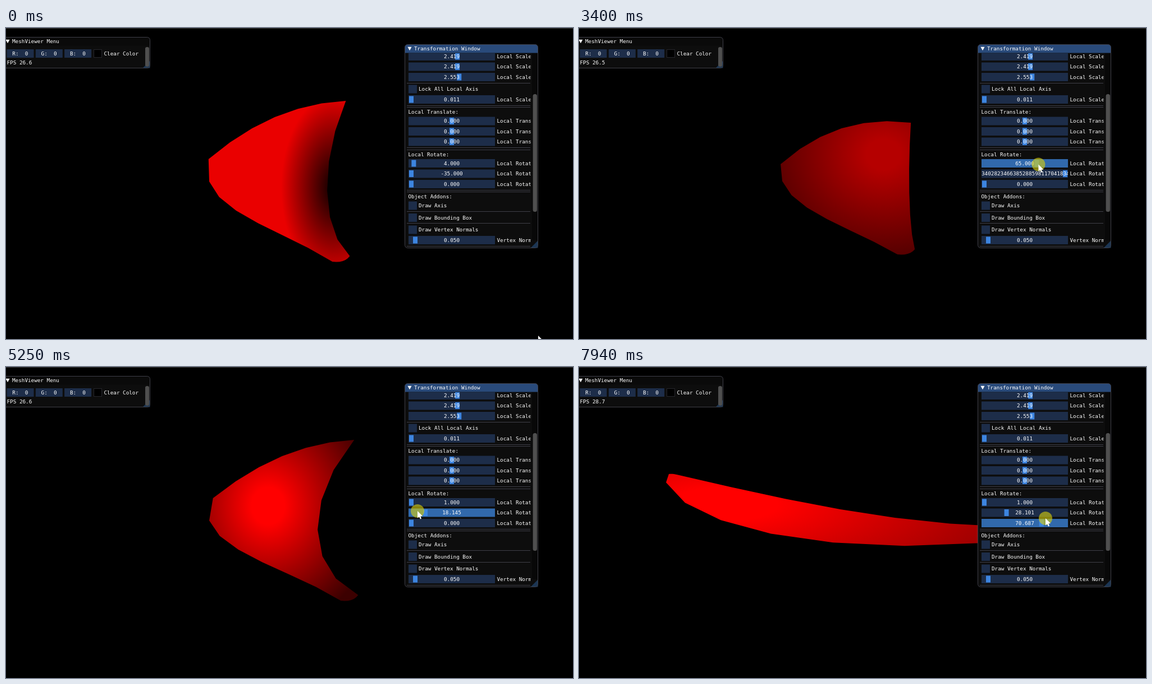
An HTML page with a canvas for the animation above (8 s loop, 1010x555 px).

```html
<!DOCTYPE html>
<html>
<head>
<meta charset="utf-8">
<style>
html, body { margin: 0; width: 100%; height: 100%; overflow: hidden; background: #000; }
canvas { display: block; }
</style>
</head>
<body>
<canvas id="stage" width="1010" height="555"></canvas>
<script>
const ctx = document.getElementById('stage').getContext('2d');
const LOOP = 8000, TICK = 69.05;
const OVERFLOW = '340282346638528859811704183469231731687303715884';
const COLORS = {
  body: '#0d0d0d', border: '#3f3f48', frame: '#1d2d49', hover: '#23456d', active: '#3169ac',
  grab: '#3d85e0', title: '#294a7a', scroll: '#4f4f4f', grip: '#1c3654'
};
const AXES = ['X', 'Y', 'Z'];
const rowY = axis => 241.5 + 18.5 * axis;

const clamp = (v, lo, hi) => Math.max(lo, Math.min(hi, v));
const lerp = (a, b, k) => Array.isArray(a) ? a.map((v, i) => lerp(v, b[i], k)) : a + (b - a) * k;

// Interpolates [tick, value] keys.
function track(keys, tick) {
  const i = keys.findIndex(k => k[0] > tick);
  if (i < 0) return keys[keys.length - 1][1];
  if (i === 0) return keys[0][1];
  const [a, b] = [keys[i - 1], keys[i]];
  return lerp(a[1], b[1], (tick - a[0]) / (b[0] - a[0]));
}

const POINTER = [[0, [948, 549]], [13, [852, 242]], [24, [858, 242]], [30, [857, 260]], [36, [857, 260]],
  [42, [864, 241]], [46, [864, 243]], [57, [697, 245]], [66, [720, 259]], [76, [733, 257]],
  [85, [814, 259]], [89, [785, 259]], [98, [725, 279]], [106, [745, 279]], [115, [831, 270]]];
const PRESSES = [[16, 24, 0], [31, 37, 1], [45, 60, 0], [65, 96, 1], [97, 116, 2]];
const FPS = [[0, 26.6], [30, 26.5], [50, 26.3], [70, 26.6], [80, 28.9], [98, 28.5], [109, 28.7]];

function rotations(tick) {
  const x = tick < 16 ? 4 : tick < 46 ? Infinity : track([[46, 97], [55, 1]], tick);
  const y = tick < 31 ? -35 : tick < 65 ? Infinity
    : track([[65, 1], [76, 18.145], [83, 64], [89, 35.291], [92, 28.101]], tick);
  const z = track([[98, 0], [106, 13.168], [115, 70.687]], tick);
  return [x, y, z];
}

// A pose is four Bezier edges (outer, lower, tip, inner) plus an elliptical
// light: centre, radii, red level at the centre and at the rim.
const LIGHTS = {
  saddle: [[585, 285], [95, 165], [40, 234]],
  front: [[467, 248], [195, 220], [255, 60]],
  top: [[520, 195], [260, 190], [255, 8]]
};
const ROLLED = {
  edges: [
    [[519, 126], [397, 140], [358, 209]],
    [[348, 243], [362, 325], [540, 360], [665, 401]],
    [[665, 401], [688, 408], [700, 401]],
    [[700, 401], [590, 355], [522, 210], [519, 126]]
  ],
  light: [[440, 220], [260, 210], [255, 50]]
};
const STRETCHED = {
  edges: [
    [[174, 192], [166, 190], [160, 191]],
    [[155, 206], [190, 283], [430, 337], [720, 314]],
    [[720, 314], [760, 305], [760, 285]],
    [[760, 285], [560, 280], [370, 238], [174, 192]]
  ],
  light: [[260, 245], [620, 200], [255, 130]]
};

function yawed(yaw, tilt) {
  const spread = Math.max(.69, Math.cos(yaw * Math.PI / 180));
  const top = 512 + 114 * spread, low = top + 7, heel = top - 24;
  const waist = 572 - 130 * (spread - .82);
  const pull = (waist - (top + low) / 8) / .75;
  const squash = ([x, y]) => [x, 265 + (y - 265) * (1 - tilt * (y < 265 ? .44 : .13))];
  const edges = [
    [[top, 130], [top - 131, 136 - 45 * tilt], [366 + .15 * yaw, 234]],
    [[362, 274], [382, 333], [heel - 81, 365], [heel, 417]],
    [[heel, 417], [heel + 21, 420], [low, 407]],
    [[low, 407], [pull, 360], [pull, 235], [top, 130]]
  ].map(edge => edge.map(squash));
  return { edges, light: lerp(yaw < 0 ? LIGHTS.saddle : LIGHTS.front, LIGHTS.top, tilt) };
}

const blend = (a, b, k) => ({ edges: lerp(a.edges, b.edges, k), light: lerp(a.light, b.light, k) });

function currentPose([x, y, z]) {
  if (z > 13.168) return blend(ROLLED, STRETCHED, (z - 13.168) / 57.519);
  const upright = yawed(y === Infinity ? -46 : y, clamp((x - 4) / 93, 0, 1));
  return blend(upright, ROLLED, z / 13.168);
}

function bezier(points, k) {
  if (points.length === 1) return points[0];
  return bezier(points.slice(1).map((p, i) => lerp(points[i], p, k)), k);
}

function drawMesh({ edges, light: [center, radii, levels] }) {
  const facets = 6;
  ctx.save();
  ctx.beginPath();
  for (const edge of edges)
    for (let i = 0; i <= facets; i++) ctx.lineTo(...bezier(edge, i / facets));
  ctx.clip();
  ctx.translate(...center);
  ctx.scale(...radii);
  const shade = ctx.createRadialGradient(0, 0, .15, 0, 0, 1);
  levels.forEach((level, i) => shade.addColorStop(i, `rgb(${level},0,0)`));
  ctx.fillStyle = shade;
  ctx.fillRect(-9, -9, 18, 18);
  ctx.restore();
}

function box(x, y, w, h, color) {
  ctx.fillStyle = color;
  ctx.fillRect(x, y, w, h);
}
function text(s, x, y, align = 'left') {
  ctx.fillStyle = '#fff';
  ctx.textAlign = align;
  ctx.fillText(s, x, y + 3.4);
}
function poly(points, color) {
  ctx.beginPath();
  points.forEach(p => ctx.lineTo(...p));
  ctx.closePath();
  ctx.fillStyle = color;
  ctx.fill();
}
function round(x, y, w, h, r, color) {
  ctx.beginPath();
  ctx.roundRect(x, y, w, h, r);
  ctx.fillStyle = color;
  ctx.fill();
}
function clipped(x, y, w, h, draw) {
  ctx.save();
  ctx.beginPath();
  ctx.rect(x, y, w, h);
  ctx.clip();
  draw();
  ctx.restore();
}

function panel(x, y, w, h, title, titleColor) {
  round(x, y, w, h, 5, COLORS.body);
  round(x, y, w, 15, [5, 5, 0, 0], titleColor);
  poly([[x + w, y + h - 13], [x + w, y + h], [x + w - 13, y + h]], COLORS.grip);
  ctx.beginPath();
  ctx.roundRect(x, y, w, h, 5);
  ctx.strokeStyle = COLORS.border;
  ctx.lineWidth = 1;
  ctx.stroke();
  const left = x + 5, mid = y + 7.3;
  poly([[left, mid - 3], [left + 7, mid - 3], [left + 3.5, mid + 3.5]], '#fff');
  text(title, left + 11.5, mid);
}

function slider(y, value, grabX, label, state = 'frame') {
  box(717, y - 7.5, 154, 15, COLORS[state]);
  box(grabX - 4, y - 6, 8, 12, COLORS.grab);
  clipped(717, y - 8, 154, 16, () => {
    if (value === OVERFLOW) text(value, 717, y);
    else text(value, 794, y, 'center');
  });
  text(label, 874.5, y);
}
function checkbox(y, label) {
  box(717, y - 7.5, 15, 15, COLORS.frame);
  text(label, 735, y);
}

function menuPanel(tick) {
  panel(-5.5, 16.5, 262, 55, 'MeshViewer Menu', '#0a0a0a');
  ['R', 'G', 'B'].forEach((channel, i) => {
    box(1.5 + i * 51.3, 38, 48, 15, COLORS.frame);
    text(channel + ':  0', 25.3 + i * 51.3, 45.5, 'center');
  });
  box(156, 38, 15, 15, '#26262b');
  box(157, 39, 13, 13, '#000');
  text('Clear Color', 174.5, 45.5);
  round(248, 34, 7, 35, 3, COLORS.scroll);
  const rate = FPS.filter(k => k[0] <= tick).pop()[1];
  text('FPS ' + rate.toFixed(1), 1.5, 62);
}

function rowState(axis, tick, [px, py]) {
  const press = PRESSES.find(([from, to]) => tick >= from && tick < to);
  if (press) return press[2] === axis ? 'active' : 'frame';
  return px > 717 && px < 871 && Math.abs(py - rowY(axis)) < 8 ? 'hover' : 'frame';
}

function transformPanel(tick, angles, pointer) {
  panel(710.5, 29.5, 237, 363, 'Transformation Window', COLORS.title);
  box(937, 45, 10, 334, '#080808');
  round(938.5, 118, 7.5, 210, 3.5, COLORS.scroll);
  clipped(711, 45, 223.5, 346, () => {
    AXES.forEach((name, i) => {
      const scale = i < 2 ? 2.419 : 2.553, angle = angles[i];
      slider(50.5 + 18.5 * i, scale.toFixed(3), 794 + (scale - 2) * 24, 'Local Scale ' + name);
      slider(166 + 18.5 * i, '0.000', 794, 'Local Translate ' + name);
      slider(rowY(i), angle === Infinity ? OVERFLOW : angle.toFixed(3),
        clamp(722 + (angle - 1) / .685, 722, 866), 'Local Rotate ' + name, rowState(i, tick, pointer));
    });
    checkbox(109, 'Lock All Local Axis');
    slider(127.5, '0.011', 722, 'Local Scale');
    text('Local Translate:', 716.5, 150);
    text('Local Rotate:', 716.5, 225.5);
    text('Object Addons:', 716.5, 301);
    checkbox(317, 'Draw Axis');
    checkbox(338.5, 'Draw Bounding Box');
    checkbox(360, 'Draw Vertex Normals');
    slider(378.5, '0.050', 729, 'Vertex Normal Length');
    for (const y of [98, 138, 141, 213, 217, 289, 292, 327, 348, 389])
      box(714, y, 220, 1, COLORS.border);
  });
}

function drawPointer(tick, [x, y]) {
  if (tick > 0) {
    ctx.beginPath();
    ctx.arc(x, y, 12, 0, 7);
    ctx.fillStyle = 'rgba(220,210,10,.6)';
    ctx.fill();
  }
  ctx.save();
  ctx.translate(x, y);
  poly([[0, 0], [0, 12.5], [3, 10], [5, 14.5], [7, 13.5], [5.2, 9.3], [9, 9]], '#fff');
  ctx.restore();
}

function frame(now) {
  const tick = Math.floor((now % LOOP + 8) / TICK);
  const angles = rotations(tick), pointer = track(POINTER, tick);
  box(0, 0, 1010, 555, '#000');
  box(0, 0, 1010, 1, '#3c3c3c');
  ctx.font = '9.3px "DejaVu Sans Mono", monospace';
  drawMesh(currentPose(angles));
  menuPanel(tick);
  transformPanel(tick, angles, pointer);
  drawPointer(tick, pointer);
  requestAnimationFrame(frame);
}
requestAnimationFrame(frame);
</script>
</body>
</html>
```
